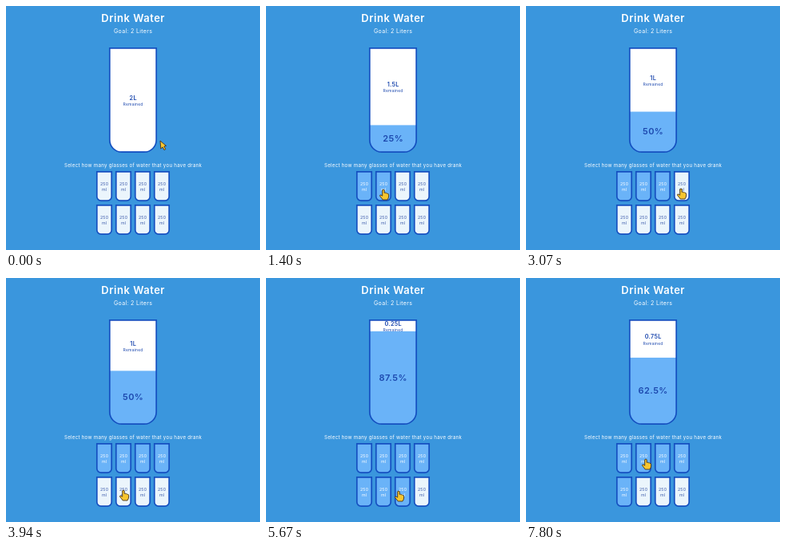
An HTML page for the animation above (8000 ms loop, 318x306 px).

```html
<!DOCTYPE html>
<html lang="en">
<head>
<meta charset="utf-8">
<title>Drink Water</title>
<style>
  html, body { margin: 0; width: 100%; height: 100%; overflow: hidden; background: #3a96dd; }
  svg { display: block; width: 318px; height: 306px; }
  text { font-family: Montserrat, Inter, sans-serif; letter-spacing: .04em; text-anchor: middle; fill: #fff; }
  .edge { fill: none; stroke: #144fc0; stroke-width: 1.7; }
  .ink { fill: #1c48ae; }
  .cursor path { fill: #f7c62f; stroke: #43321c; stroke-width: .9; stroke-linejoin: round; }
</style>
</head>
<body>
<svg id="stage" viewBox="0 0 318 306">
  <text x="159.2" y="19.6" font-size="13" font-weight="600">Drink Water</text>
  <text x="159.1" y="33.7" font-size="7.1">Goal: 2 Liters</text>
  <text x="159.1" y="201.8" font-size="6.2">Select how many glasses of water that you have drank</text>
  <clipPath id="inside"><path id="insidePath"/></clipPath>
  <g clip-path="url(#inside)">
    <rect x="129" y="52" width="60" height="132" fill="#fff"/>
    <g id="remained">
      <text id="liters" class="ink" x="159.2" font-size="7.3" font-weight="600"></text>
      <text id="label" class="ink" x="159.1" font-size="5">Remained</text>
    </g>
    <rect id="water" x="129" width="60" height="132" fill="#6ab3f8"/>
    <text id="percent" class="ink" x="159.2" font-size="11" font-weight="600"></text>
  </g>
  <path id="glass" class="edge"/>
  <g id="cups"></g>
  <g id="cursor" class="cursor">
    <path id="arrow" d="M0 0 L.8 10 L3 7.9 L5 11.6 L6.8 10.6 L4.9 7 L7.6 6.4 Z"/>
    <path id="hand" d="M-1.3 .8 Q0 -.8 1.2 .8 V4.4 Q2.4 3.6 3.2 4.8 Q4.5 4.2 5 5.4 Q6.5 5 6.6 6.8 V9 Q6.4 11 5 13 H-.8 Q-2 11 -4.4 8.4 Q-4.8 6.6 -3 7 L-1.3 8.2 Z"/>
  </g>
</svg>
<script>
const LOOP = 8000, FILL_MS = 300;
const BOTTOM = 182.4, TOP = 53.6;

// [time, glasses filled after the click]
const clicks = [[-FILL_MS, 0], [940, 2], [2218, 3], [3060, 4], [3990, 6],
                [4700, 8], [5400, 7], [6150, 6], [6830, 5]];

// [time, x, y] of the pointer tip
const path = [[0, 193, 169], [70, 193, 169], [740, 147, 230], [1670, 147, 230],
  [2130, 170, 229], [2480, 170, 229], [2930, 194, 229], [3260, 194, 229],
  [3820, 147, 266], [4200, 147, 266], [4600, 193, 266], [4850, 193, 266],
  [5140, 166, 267], [5700, 166, 267], [6050, 145, 266], [7100, 145, 266],
  [7780, 150, 227], [LOOP, 150, 227]];

const $ = id => document.getElementById(id);
const lerp = (a, b, p) => a + (b - a) * p;

function add(parent, tag, attrs, text = '') {
  const el = document.createElementNS('http://www.w3.org/2000/svg', tag);
  for (const k in attrs) el.setAttribute(k, attrs[k]);
  el.textContent = text;
  return parent.appendChild(el);
}

// Glass outline: square top, rounded bottom, inset by half the border
function outline(x, y, w, h, r, inset = .8) {
  const l = x + inset, t = y + inset, R = x + w - inset, b = y + h - inset, q = r - inset;
  return `M${l} ${t}H${R}V${b - q}A${q} ${q} 0 0 1 ${R - q} ${b}H${l + q}A${q} ${q} 0 0 1 ${l} ${b - q}Z`;
}

// CSS "ease" curve, cubic-bezier(.25, .1, .25, 1)
function ease(x) {
  if (x >= 1) return 1;
  const bez = (a, b, s) => 3 * a * s * (1 - s) ** 2 + 3 * b * s * s * (1 - s) + s ** 3;
  let lo = 0, hi = 1;
  for (let i = 0; i < 20; i++) {
    const mid = (lo + hi) / 2;
    if (bez(.25, .25, mid) < x) lo = mid; else hi = mid;
  }
  return bez(.1, 1, lo);
}

$('glass').setAttribute('d', outline(129, 52, 60, 132, 16));
$('insidePath').setAttribute('d', outline(129, 52, 60, 132, 16));

const cups = Array.from({ length: 8 }, (_, i) => {
  const x = 113 + i % 4 * 24, y = 207 + (i >> 2) * 42, d = outline(x, y, 20, 38, 6);
  const g = add($('cups'), 'g', {});
  add(g, 'path', { d, fill: '#fff', 'fill-opacity': .9 });
  const fill = add(g, 'path', { d, fill: '#6ab3f8' });
  add(g, 'path', { d, class: 'edge' });
  const words = ['250', 'ml'].map((s, n) =>
    add(g, 'text', { x: x + 10.1, y: y + 17.6 + n * 7.8, 'font-size': 5.3 }, s));
  return { x, y, fill, words };
});

function pointer(t) {
  const i = path.findIndex(p => p[0] > t);
  const [t0, x0, y0] = path[i - 1], [t1, x1, y1] = path[i];
  const u = (t - t0) / (t1 - t0), p = u * u * (3 - 2 * u);
  return [lerp(x0, x1, p), lerp(y0, y1, p)];
}

function draw(t) {
  const n = clicks.filter(c => c[0] <= t).length - 1;
  const [start, now] = clicks[n], before = n ? clicks[n - 1][1] : 0;
  const p = ease((t - start) / FILL_MS);
  const level = BOTTOM - lerp(before, now, p) / 8 * 132;

  const mid = (TOP + level) / 2;
  $('remained').setAttribute('visibility', now < 8 ? 'visible' : 'hidden');
  $('liters').textContent = 2 - now / 4 + 'L';
  $('liters').setAttribute('y', mid - .4);
  $('label').setAttribute('y', mid + 6.8);
  $('water').setAttribute('y', level);
  $('percent').textContent = now ? now * 12.5 + '%' : '';
  $('percent').setAttribute('y', (Math.max(level, TOP) + BOTTOM) / 2 + 3.9);

  cups.forEach((cup, i) => {
    const full = lerp(i < before, i < now, p);
    cup.fill.setAttribute('opacity', full);
    const color = [62, 92, 172].map(c => Math.round(lerp(c, 255, full)));
    cup.words.forEach(w => w.style.fill = `rgb(${color})`);
  });

  const [x, y] = pointer(t);
  const over = cups.some(c => x >= c.x && x <= c.x + 20 && y >= c.y && y <= c.y + 38);
  $('cursor').setAttribute('transform', `translate(${x} ${y})`);
  $('hand').setAttribute('visibility', over ? 'visible' : 'hidden');
  $('arrow').setAttribute('visibility', over ? 'hidden' : 'visible');
}

const begin = performance.now();
function tick() {
  draw((performance.now() - begin) % LOOP);
  requestAnimationFrame(tick);
}
tick();
</script>
</body>
</html>
```
